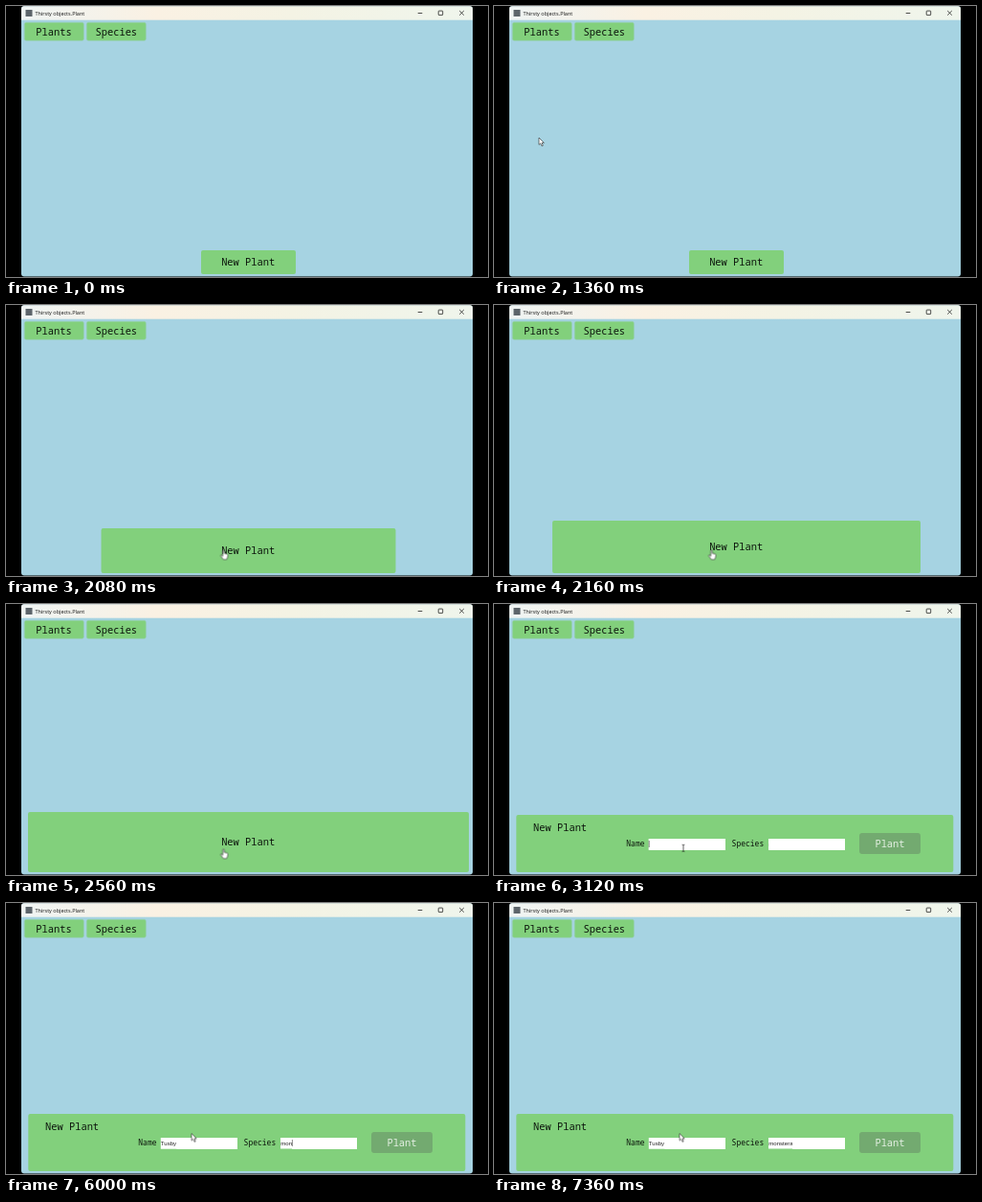
Animation, 504 px wide and 284 px high, one loop 8 s. Source, as an HTML page:

```html
<!DOCTYPE html>
<html lang="en">
<head>
<meta charset="utf-8">
<title>Thirsty objects.Plant</title>
<style>
  html, body { margin: 0; width: 100%; height: 100%; overflow: hidden; background: #000; }
  svg { display: block; width: 504px; height: 284px; }

  .mono { font: 10.4px "Noto Sans Mono", "DejaVu Sans Mono", monospace; fill: #0b130b; }
  .label { font-size: 8px; }
  .mid { text-anchor: middle; }
  .title { font: 5.5px "Open Sans", "Noto Sans", sans-serif; fill: #111; }
  .typed { font: 6.1px "Liberation Sans", Arial, sans-serif; fill: #222; }
  .green { fill: #82d07c; }
  .tab { stroke: #94cfae; stroke-width: .6; }
  .field { fill: #fff; }
  .caret { stroke: #333; stroke-width: .6; }

  /* Every animation shares one 8 s clock: 1% = 80 ms */
  .run { animation: 8s linear infinite; }
  .hard { animation-timing-function: step-end; }

  .grow { animation-name: grow; }
  .lift { animation-name: lift; }
  .before { animation-name: before; }
  .after { animation-name: after; }
  @keyframes grow {
    0%, 23.3% { x: 204px; y: 256px; width: 99px; height: 25px; }
    28%, 100% { x: 23px; y: 218px; width: 461px; height: 63px; }
  }
  @keyframes lift {
    0%, 23.3% { transform: translateY(0); }
    28%, 100% { transform: translateY(-18.8px); }
  }
  @keyframes before { 0% { opacity: 1; } 33%, 100% { opacity: 0; } }
  @keyframes after { 0% { opacity: 0; } 33%, 100% { opacity: 1; } }

  .pointer { animation-name: pointer; }
  .arrow { animation-name: arrow; }
  .hand { animation-name: hand; }
  .beam { animation-name: beam; }
  @keyframes pointer {
    0%, 17% { transform: translate(47px, 138px); animation-timing-function: ease-in-out; }
    23.6%, 33.5% { transform: translate(227.5px, 256.5px); animation-timing-function: ease-in-out; }
    37%, 43% { transform: translate(198px, 255.8px); animation-timing-function: ease-in-out; }
    46%, 100% { transform: translate(194px, 241.5px); }
  }
  @keyframes arrow { 0% { opacity: 0; } 17% { opacity: 1; } 23.3% { opacity: 0; } 45%, 100% { opacity: 1; } }
  @keyframes hand { 0% { opacity: 0; } 23.3% { opacity: 1; } 33%, 100% { opacity: 0; } }
  @keyframes beam { 0% { opacity: 0; } 33% { opacity: 1; } 45%, 100% { opacity: 0; } }

  /* The cover slides right one letter at a time and carries the caret */
  .name { animation-name: name; }
  .kind { animation-name: kind; }
  @keyframes name {
    0% { transform: translateX(0); }
    52% { transform: translateX(3.7px); }
    53% { transform: translateX(7.1px); }
    54% { transform: translateX(10.2px); }
    57% { transform: translateX(13.6px); }
    59%, 100% { transform: translateX(16.6px); }
  }
  @keyframes kind {
    0% { transform: translateX(0); }
    69% { transform: translateX(5.1px); }
    71% { transform: translateX(8.5px); }
    74% { transform: translateX(11.9px); }
    78% { transform: translateX(14.9px); }
    80% { transform: translateX(16.6px); }
    82% { transform: translateX(20px); }
    84% { transform: translateX(22px); }
    86%, 100% { transform: translateX(25.4px); }
  }

  .name-caret { animation-name: name-caret; }
  .kind-caret { animation-name: kind-caret; }
  @keyframes name-caret {
    0% { opacity: 0; }
    38% { opacity: 1; }
    45% { opacity: 0; }
    51% { opacity: 1; }
    61%, 100% { opacity: 0; }
  }
  @keyframes kind-caret {
    0% { opacity: 0; }
    61% { opacity: 1; }
    67% { opacity: 0; }
    69% { opacity: 1; }
    92%, 100% { opacity: 0; }
  }
</style>
</head>
<body>
<svg viewBox="0 0 504 284">
  <defs>
    <linearGradient id="bar">
      <stop offset="0" stop-color="#eff4f3"/>
      <stop offset=".3" stop-color="#faf1e3"/>
      <stop offset=".6" stop-color="#f4f3e4"/>
      <stop offset="1" stop-color="#eff5ec"/>
    </linearGradient>
    <clipPath id="window"><rect x="16" y=".3" width="472" height="283.2" rx="3"/></clipPath>
    <clipPath id="name-box"><rect x="161.8" y="246" width="79.7" height="11.8"/></clipPath>
    <clipPath id="kind-box"><rect x="287" y="246" width="79.6" height="11.6"/></clipPath>
  </defs>

  <g clip-path="url(#window)">
    <rect x="16" width="472" height="284" fill="#a6d3e2"/>
    <rect x="16" width="472" height="14.7" fill="url(#bar)"/>
  </g>
  <rect x="20.5" y="4" width="7" height="7" fill="#5d656b"/>
  <text class="title" x="30.5" y="9.6">Thirsty objects.Plant</text>
  <g fill="none" stroke="#222" stroke-width=".8">
    <path d="M430.7 7.5h4.6M474.2 5l4.6 4.6M478.8 5l-4.6 4.6"/>
    <rect x="452.2" y="5.1" width="4.5" height="4.5" rx=".6"/>
  </g>

  <rect class="green tab" x="19.3" y="17.3" width="62" height="19" rx="1.8"/>
  <rect class="green tab" x="84.3" y="17.3" width="62" height="19" rx="1.8"/>
  <text class="mono mid" x="50" y="30.7">Plants</text>
  <text class="mono mid" x="115.3" y="30.7">Species</text>

  <g class="run hard before">
    <rect class="green run grow" x="204" y="256" width="99" height="25" rx="2"/>
    <text class="mono mid run lift" x="253.2" y="272.2">New Plant</text>
  </g>

  <g class="run hard after">
    <rect class="green" x="23.3" y="221" width="457" height="60" rx="2"/>
    <text class="mono" x="41" y="237.7">New Plant</text>
    <text class="mono label" x="138.3" y="254.4">Name</text>
    <text class="mono label" x="248.6" y="254.2">Species</text>

    <g clip-path="url(#name-box)">
      <rect class="field" x="161" y="245" width="82" height="14"/>
      <text class="typed" x="161.8" y="254">Tusby</text>
      <g class="run hard name">
        <rect class="field" x="161.8" y="245" width="82" height="14"/>
        <path class="caret run hard name-caret" d="M162.2 248v7"/>
      </g>
    </g>

    <g clip-path="url(#kind-box)">
      <rect class="field" x="286" y="245" width="82" height="14"/>
      <text class="typed" x="287.2" y="253.8">monstera</text>
      <g class="run hard kind">
        <rect class="field" x="287.2" y="245" width="82" height="14"/>
        <path class="caret run hard kind-caret" d="M287.6 248v7"/>
      </g>
    </g>

    <rect x="382" y="240" width="64" height="22" rx="3" fill="#73aa70"/>
    <text class="mono mid" x="414" y="254.9" style="fill:#e6f1e5">Plant</text>
  </g>

  <g class="run pointer">
    <path class="run hard arrow" d="M0 0v7.4l1.7-1.5 1.3 2.9 1.3-.6-1.3-2.8h2.3z" fill="#fff" stroke="#222" stroke-width=".6" stroke-linejoin="round"/>
    <path class="run hard hand" d="M-.8.8q.8-1.2 1.6 0v3l3 .7q.9.3.8 1.2l-.6 2.8-.8 1.7h-3.5l-1.4-2-1.5-2q.3-1.1 1.3-.5l1.1 1z" fill="#fff" stroke="#222" stroke-width=".6" stroke-linejoin="round"/>
    <path class="run hard beam" d="M-1.4-3.6q1.4 0 1.4.7 0-.7 1.4-.7M0-2.9v5.8M-1.4 3.6q1.4 0 1.4-.7 0 .7 1.4.7" fill="none" stroke="#222" stroke-width=".7"/>
  </g>
</svg>
</body>
</html>
```
